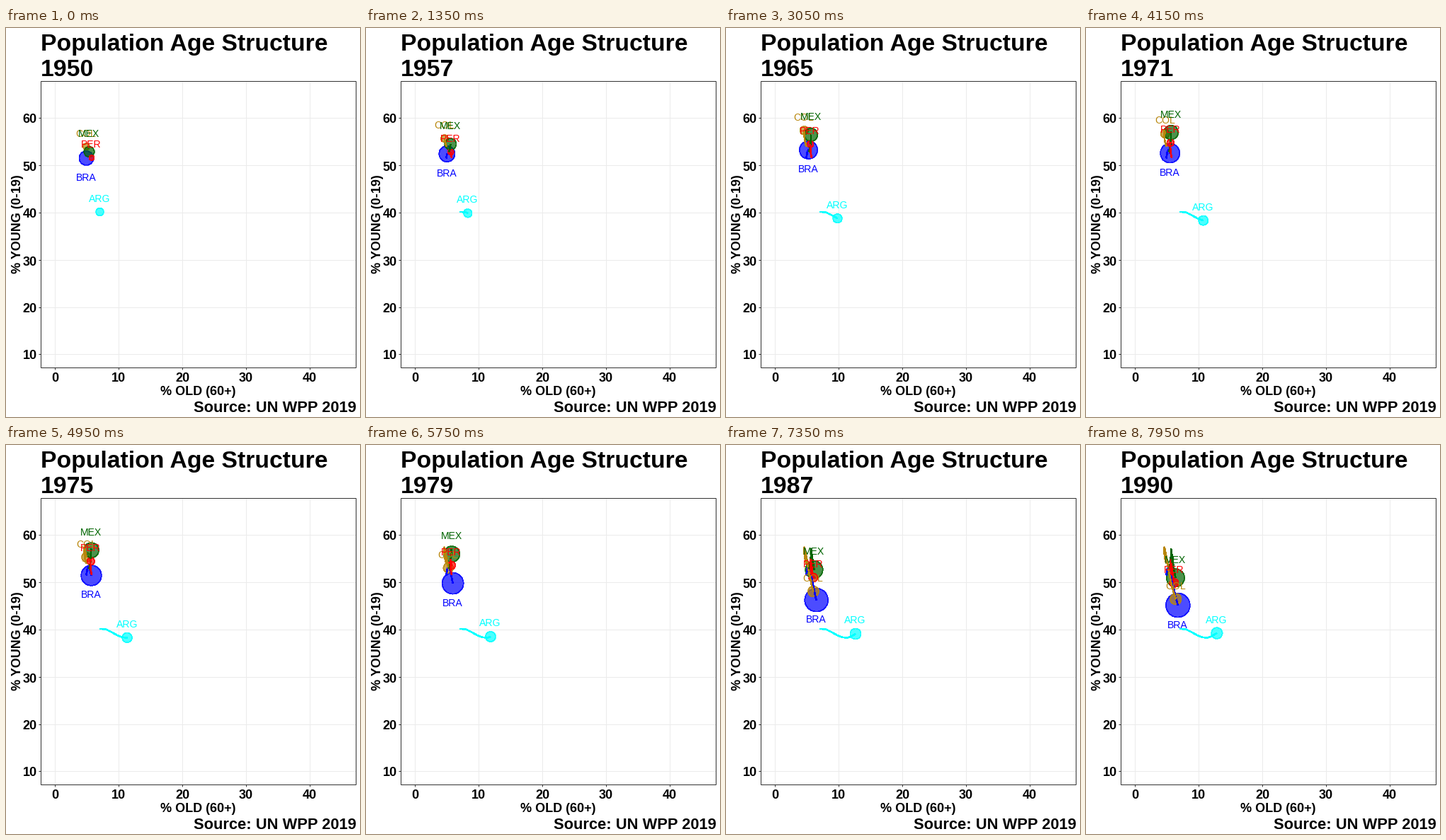
A matplotlib script that plays this animation: 500 by 550 pixels, repeating every 8 s.

```python
import numpy as np
import matplotlib.pyplot as plt
from matplotlib.animation import FuncAnimation
from matplotlib.patches import Circle, Rectangle

W, H, DPI = 500, 550, 100
FRAMES, INTERVAL = 160, 50
YEAR_STEP = 150 / 599          # years revealed per frame
PX = 72 / DPI                  # points per pixel
KNOTS = np.arange(1950, 1991, 5)
GREY = "#333333"

plt.rcParams["font.family"] = "Liberation Sans"

fig = plt.figure(figsize=(W / DPI, H / DPI), dpi=DPI, facecolor="white")
ax = fig.add_axes([0, 0, 1, 1])
ax.set_xlim(0, W)
ax.set_ylim(H, 0)
ax.axis("off")


def text(x, y, s, size, ha="left", weight="bold", **kw):
    return ax.text(x, y, s, fontsize=size * PX, ha=ha, va="baseline",
                   weight=weight, **kw)


def line(xs, ys, color, z):
    ax.plot(xs, ys, color=color, lw=PX, zorder=z, snap=False,
            solid_capstyle="butt")


def draw_chart():
    left, top, right, bottom = 49.5, 75.5, 494.5, 480.5
    for k in range(5):
        x = 69.5 + 90 * k
        line([x, x], [top, bottom], "#EBEBEB", 1)
        line([x, x], [bottom, bottom + 3], GREY, 2)
        text(x - 0.5, 500, str(10 * k), 18, "center")
    for k in range(1, 7):
        y = np.floor(528.6 - 66.8 * k) + 0.5
        line([left, right], [y, y], "#EBEBEB", 1)
        line([left - 3, left], [y, y], GREY, 2)
        text(44, y + 7, str(10 * k), 18, "right")
    ax.add_patch(Rectangle((left, top), right - left, bottom - top,
                           fill=False, ec=GREY, lw=PX, zorder=20, snap=False))
    text(49, 32, "Population Age Structure", 33.8)
    text(271, 519, "% OLD (60+)", 18, "center")
    text(21, 277, "% YOUNG (0-19)", 18, "center",
         rotation=90, rotation_mode="anchor")
    text(494.5, 543, "Source: UN WPP 2019", 21.9, "right")


def curve(*keys):
    """Polynomial through evenly spaced key values, sampled at the knots."""
    t = np.linspace(0, 1, len(keys))
    fit = np.polyfit(t, keys, len(keys) - 1)
    return np.polyval(fit, np.linspace(0, 1, len(KNOTS))) + 0.5


class Country:
    def __init__(self, name, color, shift, radii, xs, ys):
        self.shift, self.radii, self.xs, self.ys = shift, radii, xs, ys
        self.fill = Circle((0, 0), 1, fc=color, ec="none", alpha=0.7,
                           zorder=5, antialiased=False)
        self.ring = Circle((0, 0), 1, fc="none", ec=color, alpha=0.7,
                           lw=0.75 * PX, zorder=5, antialiased=False)
        ax.add_patch(self.fill)
        ax.add_patch(self.ring)
        self.trail, = ax.plot([], [], color=color, lw=1.6 * PX, zorder=6,
                              antialiased=False, solid_capstyle="butt")
        self.label = text(0, 0, name, 14, "center", "normal",
                          color=color, zorder=7)

    def show(self, year):
        x = np.interp(year, KNOTS, self.xs)
        y = np.interp(year, KNOTS, self.ys)
        r = np.interp(year, (1950, 1990), self.radii)
        for disc in (self.fill, self.ring):
            disc.center = x, y
            disc.radius = r
        past = KNOTS < year
        self.trail.set_data(np.append(self.xs[past], x),
                            np.append(self.ys[past], y))
        self.label.set_position((x - 0.5, y + self.shift + 5))


draw_chart()
year_text = text(49, 68, "", 33.8)
countries = [
    Country("ARG", "cyan", -19.5, (5.4, 7.8),
            curve(132, 154, 173, 184.5), curve(259.5, 264, 271.5, 270, 265.5)),
    Country("BRA", "blue", 27, (10, 17),
            curve(113, 117.8, 129.5), curve(183.5, 174, 175, 198.5, 226.5)),
    Country("COL", "darkgoldenrod", -19, (4.6, 7.8),
            curve(113, 111, 126.5), curve(167, 149.5, 147, 178, 218)),
    Country("MEX", "darkgreen", -26, (7.2, 12.7),
            curve(117, 119.5, 120.2, 126), curve(174.5, 158, 147, 155.5, 188)),
    Country("PER", "red", -19.5, (3.6, 6.2),
            curve(120.5, 118.7, 124), curve(183, 170, 161.5, 171.5, 195)),
]


def update(i):
    year = 1950 + i * YEAR_STEP
    year_text.set_text(f"{year:.0f}")
    for c in countries:
        c.show(year)
    return []


anim = FuncAnimation(fig, update, frames=FRAMES, interval=INTERVAL,
                     repeat=True, repeat_delay=0, blit=False)
plt.show()
```
